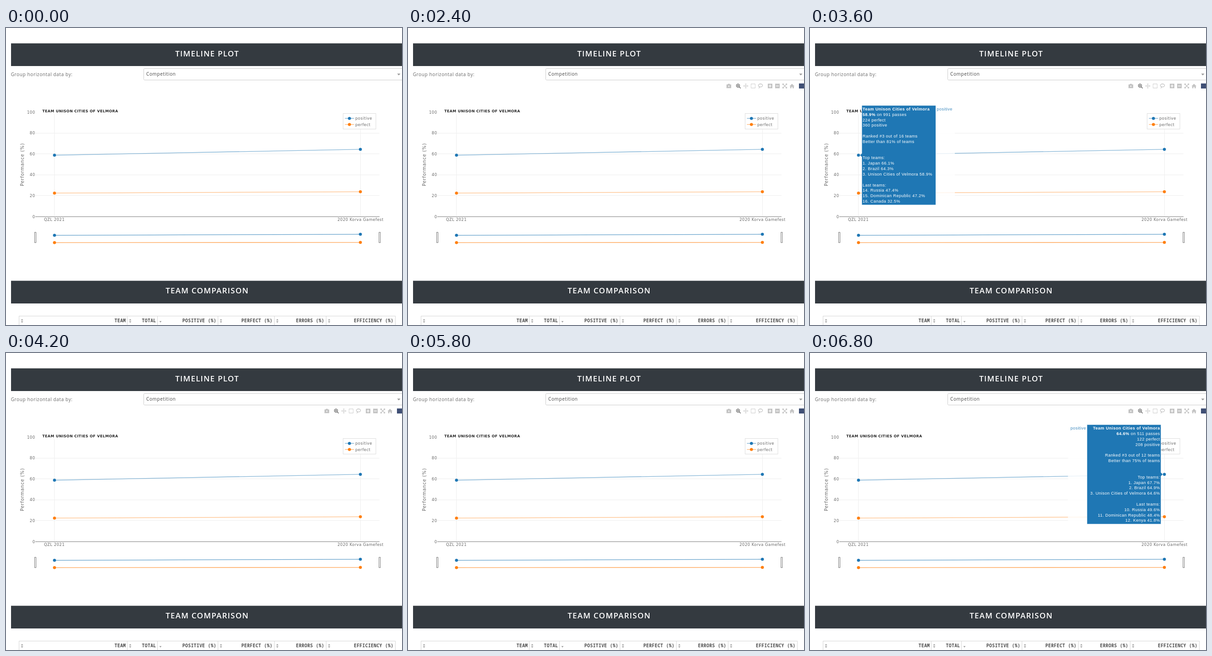
Write an HTML page that moves like this. It is 864x648 px and loops after 8 s.

```html
<!DOCTYPE html>
<html lang="en">
<head>
<meta charset="utf-8">
<title>Timeline plot</title>
<style>
html, body { margin: 0; width: 100%; height: 100%; overflow: hidden; background: #fff; }
svg { display: block; }
text { white-space: pre; }
.head { font: 600 17px "Open Sans", sans-serif; letter-spacing: 1.25px; fill: #fff; text-anchor: middle; }
.form { font: 10px "Open Sans", sans-serif; letter-spacing: .63px; fill: #666; }
.plot { font: 8.4px "DejaVu Sans", sans-serif; letter-spacing: .5px; fill: #666; }
.axis { font-size: 9.8px; letter-spacing: .8px; text-anchor: middle; }
.name { font-size: 7.8px; font-weight: 700; letter-spacing: .45px; fill: #222; }
.cell { font: 600 9.8px "Noto Sans Mono", "DejaVu Sans Mono", monospace; letter-spacing: .3px; fill: #4c4c4c; text-anchor: end; }
.tip { font: 9.1px "Liberation Sans", Arial, sans-serif; letter-spacing: .43px; }
.b { font-weight: 700; letter-spacing: .47px; }
.end { text-anchor: end; }
.mid { text-anchor: middle; }
.grid { stroke: #eee; fill: none; }
.rule { stroke: #d6d6d6; fill: none; }
.icon { stroke: #c4c4c4; fill: none; stroke-width: 1.3; }
.solid { fill: #c4c4c4; }
</style>
</head>
<body>
<svg id="stage" width="864" height="648" viewBox="0 0 864 648">
  <rect width="864" height="648" fill="#fff"/>
  <g fill="#343a40">
    <rect x="11" y="33.5" width="853" height="49.5"/>
    <rect x="11" y="551.5" width="853" height="49.5"/>
  </g>
  <text class="head" x="439" y="61.6">TIMELINE PLOT</text>
  <text class="head" x="439" y="579">TEAM COMPARISON</text>

  <text class="form" x="10.7" y="104.5">Group horizontal data by:</text>
  <rect x="300.5" y="88.5" width="580" height="25" rx="2" fill="#fff" stroke="#ccc"/>
  <text class="form" x="306" y="104" style="fill:#444">Competition</text>
  <path d="M853.5 99.5h7l-3.5 4z" fill="#999"/>

  <g id="chart"></g>
  <g id="table"></g>

  <g id="tools">
    <g class="icon">
      <path d="M695.5 124h2l1-1.5h3l1 1.5h2v6.5h-9z" class="solid"/>
      <circle cx="700" cy="127" r="2" fill="#fff"/>
      <g stroke="#777" stroke-width="1.5">
        <circle cx="720" cy="125.8" r="3.5"/>
        <path d="M722.6 128.4l3.2 3.2M718.2 125.8h3.6M720 124v3.6"/>
      </g>
      <path d="M732 126.5h10M737 121.5v10M735.6 123l1.4-1.4 1.4 1.4M735.6 130l1.4 1.4 1.4-1.4M733.5 125.1l-1.4 1.4 1.4 1.4M740.5 125.1l1.4 1.4-1.4 1.4" stroke-width="1"/>
      <rect x="748.5" y="122" width="9" height="9" stroke-dasharray="1.8 1.2"/>
      <ellipse cx="769" cy="125.3" rx="4.6" ry="3.3"/>
      <path d="M765.5 127.5c2 .5 2 2-.3 4"/>
      <path class="solid" stroke="none" d="M785 121.5h10v10h-10zM801 121.5h10v10h-10z"/>
      <path d="M787 126.5h6M790 123.5v6M803 126.5h6" stroke="#fff" stroke-width="1.6"/>
      <path d="M817.5 122l9 9M826.5 122l-9 9M817.5 124.5V122h2.5M824 122h2.5v2.5M826.5 128.5v2.5H824M820 131h-2.5v-2.5"/>
      <path class="solid" stroke="none" d="M832.5 127l5.3-5.2 5.3 5.2h-1.3v4.5h-2.8v-3h-2.4v3h-2.8V127z"/>
    </g>
    <rect x="853" y="121" width="11" height="11" fill="#3f4f75"/>
  </g>
</svg>
<script>
const LOOP = 8000, BLUE = '#1f77b4', ORANGE = '#ff7f0e';
const TEAM = 'Unison Cities of Velmora';
const $ = id => document.getElementById(id);

function add(parent, tag, attrs, text) {
  const el = document.createElementNS('http://www.w3.org/2000/svg', tag);
  for (const k in attrs) el.setAttribute(k, attrs[k]);
  if (text) el.textContent = text;
  parent.append(el);
  return el;
}

function drawChart(g) {
  const label = (x, y, text, cls = '') => add(g, 'text', { x, y, class: 'plot ' + cls }, text);
  const yAt = v => 411.5 - v * 2.276;
  const left = 105.8, right = 773.2;

  for (let v = 0; v <= 100; v += 20) {
    if (v && v < 100) add(g, 'path', { class: 'grid', d: `M64 ${Math.floor(yAt(v)) + .5}H815` });
    label(63.5, yAt(v) + 3, String(v), 'end');
  }
  add(g, 'path', { class: 'grid', d: 'M105.5 188V411M773.5 188V411' });
  add(g, 'path', { d: 'M64 411.7H815', stroke: '#777' });

  const series = (y1, y2, color, opacity) => {
    add(g, 'path', { d: `M${left} ${y1}L${right} ${y2}`, stroke: color, 'stroke-width': 1.3, opacity });
    add(g, 'circle', { cx: left, cy: y1, r: 3.3, fill: color });
    add(g, 'circle', { cx: right, cy: y2, r: 3.3, fill: color });
  };
  series(277.5, 264.7, BLUE, .55);
  series(360.2, 357.3, ORANGE, .5);
  series(452.3, 450, BLUE, .7);
  series(468.3, 467.8, ORANGE, .7);
  for (const x of [62.5, 813.8])
    add(g, 'rect', { x, y: 445.8, width: 3, height: 22.4, fill: '#fff', stroke: '#666', 'stroke-width': .9 });

  label(105.5, 421, 'QZL 2021', 'mid');
  label(773.5, 421, '2020 Korva Gamefest', 'mid');
  label(79.3, 184, ('Team ' + TEAM).toUpperCase(), 'name');
  const axis = label(0, 0, 'Performance (%)', 'axis');
  axis.setAttribute('transform', 'translate(39.3 298) rotate(-90)');

  add(g, 'rect', { x: 735.5, y: 186.5, width: 71.5, height: 34, fill: '#fff', stroke: '#ddd' });
  [['positive', BLUE, 197.2], ['perfect', ORANGE, 210.5]].forEach(([text, color, y]) => {
    add(g, 'path', { d: `M739.5 ${y}h20`, stroke: color, 'stroke-width': 1.3, opacity: .6 });
    add(g, 'circle', { cx: 749.3, cy: y, r: 3.3, fill: color });
    label(762, y + 3, text);
  });
}

function drawTable(g) {
  const cols = [['TEAM', 261.5, 28.5], ['TOTAL', 327.5, 264.5], ['POSITIVE (%)', 459, 330.5],
    ['PERFECT (%)', 581.5, 462.5], ['ERRORS (%)', 694.5, 585.5], ['EFFICIENCY (%)', 845.5, 698.5]];
  add(g, 'path', { class: 'rule', d: 'M28 628.5H850M849.5 628V648' });
  cols.forEach(([text, end, x], i) => {
    add(g, 'path', { class: 'rule', d: `M${x} 628V648` });
    const down = 'h5l-2.5 3z', up = 'h5l-2.5 -3z', ix = x + 4;
    add(g, 'path', { fill: '#999', d: (i === 2 ? '' : `M${ix} 638${up}`) + `M${ix} ${i === 2 ? 639.5 : 640}${down}` });
    add(g, 'text', { class: 'cell', x: end, y: 642.3 }, text);
  });
}

// A line may start with a bold part, closed by "|".
function tooltip({ x, y, w, h, tip, flip, fill, ink, edge, label, labelW, lines }) {
  const g = add($('stage'), 'g', { class: 'tip' });
  const side = flip ? x - labelW : x + w;
  add(g, 'rect', { x: side, y, width: labelW, height: h, fill: '#fff', opacity: .8 });
  add(g, 'text', { x: flip ? x - 1.8 : side + 2, y: y + 11, fill, class: flip ? 'end' : '', opacity: .85 }, label);
  const near = flip ? x + w : x, far = flip ? x : x + w, nose = near + (flip ? 4 : -4);
  add(g, 'path', {
    d: `M${nose} ${tip}L${near} ${tip - 4}V${y}H${far}V${y + h}H${near}V${tip + 4}Z`,
    fill, stroke: edge, 'stroke-width': .7
  });
  lines.forEach((line, i) => {
    const t = add(g, 'text', { x: flip ? near - 2 : near + 1.8, y: y + 11 + i * 11.83, fill: ink, class: flip ? 'end' : '' });
    const [bold, rest] = line.includes('|') ? line.split('|') : ['', line];
    if (bold) add(t, 'tspan', { class: 'b' }, bold);
    if (rest) add(t, 'tspan', {}, rest);
  });
  return g;
}

function show(el, from, to) {
  const key = (opacity, t) => ({ opacity, offset: t / LOOP, easing: 'step-end' });
  const keys = [key(0, 0), key(1, from)];
  if (to < LOOP) keys.push(key(0, to));
  keys.push(key(to < LOOP ? 0 : 1, LOOP));
  el.animate(keys, { duration: LOOP, iterations: Infinity });
}

drawChart($('chart'));
drawTable($('table'));

const title = `Team ${TEAM}|`;
const blue = { fill: BLUE, ink: '#fff', edge: '#fff', label: 'positive', labelW: 41.5, w: 161.5, h: 217 };

const firstPositive = tooltip({
  ...blue, x: 113, y: 169, tip: 277.5,
  lines: [title, '58.9%| on 991 passes', '224 perfect', '360 positive', '',
    'Ranked #3 out of 16 teams', 'Better than 81% of teams', '', '',
    'Top teams:', '1. Japan 66.1%', '2. Brazil 64.3%', `3. ${TEAM} 58.9%`, '',
    'Last teams:', '14. Russia 47.4%', '15. Dominican Republic 47.2%', '16. Canada 32.5%']
});
const firstPerfect = tooltip({
  x: 113, y: 257.7, w: 156, h: 205.5, tip: 360.2,
  fill: ORANGE, ink: '#444', edge: '#444', label: 'perfect', labelW: 37.5,
  lines: [title, '22.6%| on 991 passes', '224 perfect', '',
    'Ranked #8 out of 16 teams', 'Better than 50% of teams', '', '',
    'Top teams:', '1. Japan 31.7%', '2. Brazil 29.0%', '3. China 24.5%', '',
    'Last teams:', '14. Dominican Republic 17.0%', '15. Russia 15.9%', '16. Canada 10.3%']
});
const lastPositive = tooltip({
  ...blue, x: 604.3, y: 156.3, tip: 264.7, flip: true,
  lines: [title, '64.6%| on 511 passes', '122 perfect', '208 positive', '',
    'Ranked #3 out of 12 teams', 'Better than 75% of teams', '', '',
    'Top teams:', '1. Japan 67.7%', '2. Brazil 64.9%', `3. ${TEAM} 64.6%`, '',
    'Last teams:', '10. Russia 49.6%', '11. Dominican Republic 48.4%', '12. Kenya 41.8%']
});

show($('tools'), 2400, LOOP);
show(firstPositive, 2600, 4200);
show(firstPerfect, 4800, 5800);
show(lastPositive, 6600, LOOP);
</script>
</body>
</html>
```
